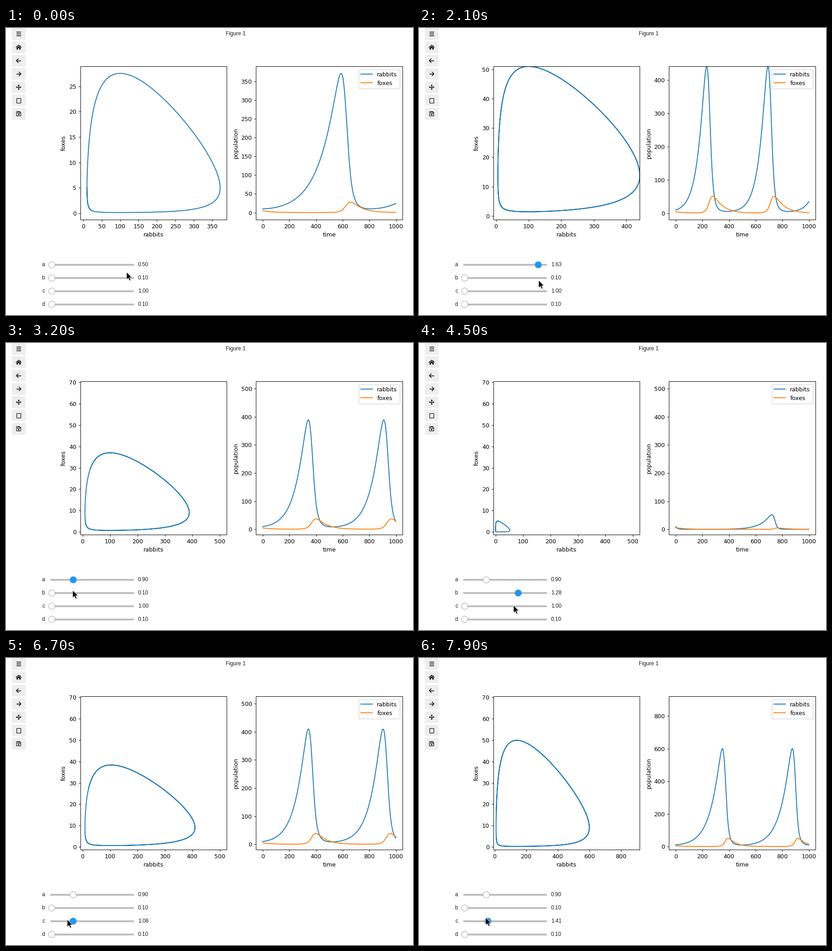
A matplotlib script for the animation above (8000 ms loop, 891 by 629 pixels).

```python
import numpy as np
import matplotlib.pyplot as plt
from matplotlib.animation import FuncAnimation
from matplotlib.patches import Circle, Polygon, Rectangle

W, H, DPI = 891, 629, 100
FRAMES, STEP = 80, 100
SCALE = 0.91  # default plot style, shrunk slightly
INK = "#1c1c1c"
BLUE = "#2196f3"

for key in ("font.size", "lines.linewidth", "axes.linewidth", "axes.labelpad",
            "patch.linewidth", "xtick.major.size", "ytick.major.size",
            "xtick.major.width", "ytick.major.width",
            "xtick.major.pad", "ytick.major.pad"):
    plt.rcParams[key] *= SCALE
plt.rcParams["font.family"] = "DejaVu Sans"


def px(n):
    """Pixels to points."""
    return n * 72 / DPI


def track(keys):
    """Piecewise linear motion over frame numbers."""
    times = [k[0] for k in keys]
    columns = list(zip(*[k[1:] for k in keys]))
    return lambda t: np.array([np.interp(t, times, c) for c in columns])


# ---- motion -----------------------------------------------------------
RANGES = [(0.5, 2), (0.1, 3), (1, 3), (0.1, 2)]
drag = [
    track([(12, .5), (13, .53), (19, 1.38), (20, 1.63), (21, 1.865),
           (23, 1.945), (25, 1.87), (28, 1.39), (30, .9)]),
    track([(38, .1), (43, 1.28), (44, 1.28), (45, 2.02), (47, 2.4),
           (48, 2.4), (51, 1.5), (54, .1)]),
    track([(64, 1), (65, 1.0424), (66, 1.08), (67, 1.53), (68, 1.984),
           (71, 1.984), (72, 1.88), (75, 1.284), (76, 1.284), (77, 1.41),
           (78, 1.41), (79, 1.576)]),
    track([(0, .1)]),
]
pointer = track([
    (2, 264, 535), (3, 180, 521), (4, 141, 517), (5, 141, 517),
    (6, 108, 513), (7, 87, 512), (8, 87, 512), (11, 99, 519.5),
    (12, 99, 519.5), (19, 203, 541), (20, 232, 548), (21, 262, 553),
    (23, 270, 557), (25, 262, 557), (28, 205, 553), (30, 147, 546),
    (32, 146, 542), (34, 114, 565), (37, 99, 548), (38, 99, 548),
    (43, 172, 570), (45, 207, 575), (47, 236, 577), (48, 236, 577),
    (51, 184, 574), (54, 101, 560), (56, 99, 552), (60, 99, 552),
    (63, 99, 574), (64, 99, 574), (66, 107, 572), (67, 134, 573),
    (68, 178, 584), (70, 187, 590), (71, 187, 590), (72, 177, 590),
    (75, 125, 580), (77, 135, 574), (79, 146, 569)])


def active_slider(i):
    return int(np.searchsorted([11, 37, 63], i, side="right")) - 1


# ---- predator and prey, all frames integrated together ----------------
frames = np.arange(FRAMES)
shown = np.array([m(frames)[0] for m in drag])
labels = np.array([m(frames - 1)[0] for m in drag])
a, b, c, d = np.array([m(np.where(frames == 70, 70, frames - 2))[0]
                       for m in drag])


def growth(z):
    x, y = z
    return np.array([a * x - b * x * y, -c * y + d * b * x * y])


def integrate(n=1000, span=15):
    h = span / (n - 1)
    out = np.empty((n, 2, FRAMES))
    out[0] = [[10], [5]]
    for k in range(n - 1):
        z = out[k]
        k1 = growth(z)
        k2 = growth(z + h / 2 * k1)
        k3 = growth(z + h / 2 * k2)
        k4 = growth(z + h * k3)
        out[k + 1] = z + h / 6 * (k1 + 2 * k2 + 2 * k3 + k4)
    return out


data = integrate()
rabbits, foxes = data[:, 0], data[:, 1]


def limits(low, high):
    """Margins around the first data, then only growth."""
    pad = 0.05 * (high[0] - low[0])
    lo, hi = low.copy(), high.copy()
    lo[0] -= pad
    hi[0] += pad
    return np.column_stack([np.minimum.accumulate(lo),
                            np.maximum.accumulate(hi)])


lim_r = limits(rabbits.min(0), rabbits.max(0))
lim_f = limits(foxes.min(0), foxes.max(0))
lim_p = limits(data.min((0, 1)), data.max((0, 1)))

# ---- figure -----------------------------------------------------------
fig = plt.figure(figsize=(W / DPI, H / DPI), dpi=DPI, facecolor="white")
ui = fig.add_axes([0, 0, 1, 1])
ui.set(xlim=(0, W), ylim=(H, 0))
ui.axis("off")


def plot_axes(x, xlabel, ylabel):
    y, w, h = 84.2, 320.57, 335.5
    ax = fig.add_axes([x / W, 1 - (y + h) / H, w / W, h / H])
    ax.set(xlabel=xlabel, ylabel=ylabel)
    return ax


phase = plot_axes(162.75, "rabbits", "foxes")
series = plot_axes(547.4, "time", "population")
orbit, = phase.plot(rabbits[:, 0], foxes[:, 0])
line_r, = series.plot(rabbits[:, 0], label="rabbits")
line_f, = series.plot(foxes[:, 0], label="foxes")
series.set_xlim(-49.95, 1048.95)
series.legend(loc="upper right")


def text(x, y, s, ha="left"):
    return ui.text(x, y, s, ha=ha, va="baseline", color=INK,
                   family="Liberation Sans", size=px(11.83))


def stroke(points, width=1.7):
    xs, ys = zip(*points)
    ui.plot(xs, ys, color=INK, lw=px(width), solid_capstyle="butt",
            solid_joinstyle="miter")


def shape(points, **style):
    patch = Polygon(points, **{"fc": INK, "ec": "none", **style})
    ui.add_patch(patch)
    return patch


text(503, 16, "Figure 1", "center")

# ---- toolbar ----------------------------------------------------------
CX = 27.7
rows = [13.3 + 29.1 * k for k in range(7)]
for y in rows:
    ui.add_patch(Rectangle((13, y - 13), 30, 25.6, fc="#eeeeee", ec="none"))

for dy in (-4, 0, 4):
    stroke([(CX - 5.2, rows[0] + dy), (CX + 5.2, rows[0] + dy)])

y = rows[1]
stroke([(CX - 6.2, y + .4), (CX, y - 4.8), (CX + 6.2, y + .4)], 1.5)
shape([(CX + 2.8, y - 4.8), (CX + 4.4, y - 4.8), (CX + 4.4, y), (CX + 2.8, y)])
shape([(CX + u, y + v) for u, v in (
    (-4.5, .9), (0, -2.9), (4.5, .9), (4.5, 5), (1.4, 5), (1.4, 1.9),
    (-1.4, 1.9), (-1.4, 5), (-4.5, 5))])

for y, s in ((rows[2], -1), (rows[3], 1)):
    stroke([(CX - 5 * s, y), (CX + 4.6 * s, y)])
    stroke([(CX + .5 * s, y - 4.6), (CX + 5 * s, y), (CX + .5 * s, y + 4.6)])

y = rows[4]
stroke([(CX - 4.5, y), (CX + 4.5, y)], 1.5)
stroke([(CX, y - 4.5), (CX, y + 4.5)], 1.5)
for u, v in ((1, 0), (-1, 0), (0, 1), (0, -1)):
    shape([(CX + 6 * u, y + 6 * v),
           (CX + 3.3 * u + 2.5 * v, y + 3.3 * v + 2.5 * u),
           (CX + 3.3 * u - 2.5 * v, y + 3.3 * v - 2.5 * u)])

y = rows[5]
ui.add_patch(Rectangle((CX - 4.7, y - 4.7), 9.4, 9.4, fill=False, ec=INK,
                       lw=px(1.3)))

y = rows[6]
shape([(CX - 4.7, y - 4.7), (CX + 2.5, y - 4.7), (CX + 4.7, y - 2.5),
       (CX + 4.7, y + 4.7), (CX - 4.7, y + 4.7)],
      fc="none", ec=INK, lw=px(1.3))
ui.add_patch(Rectangle((CX - 2.7, y - 4), 4.8, 2.8, fill=False, ec=INK,
                       lw=px(1)))
ui.add_patch(Circle((CX, y + 1.8), 1.5, fc=INK, ec="none"))

# ---- sliders ----------------------------------------------------------
handles, values = [], []
for k, name in enumerate("abcd"):
    y = 519 + 28.9 * k
    ui.add_patch(Rectangle((97, y - 2), 183, 3.8, fc="#bdbdbd", ec="none"))
    knob = Circle((100, y), 7, lw=px(1), zorder=4)
    ui.add_patch(knob)
    handles.append(knob)
    text(85, y + 3, name, "right")
    values.append(text(288.7, y + 3, ""))

ARROW = np.array([(0, 0), (0, 16.3), (3.7, 12.9), (6.3, 18.6), (8.9, 17.4),
                  (6.4, 11.9), (11.6, 11.7)])
shadow = shape(ARROW, fc="black", alpha=.25, zorder=5)
arrow = shape(ARROW, fc="black", ec="white", lw=px(.8), zorder=6)


def draw(i):
    on = active_slider(i)
    for k, (lo, hi) in enumerate(RANGES):
        frac = (shown[k, i] - lo) / (hi - lo)
        handles[k].center = (100 + 177 * frac, 519 + 28.9 * k)
        handles[k].set_facecolor(BLUE if k == on else "white")
        handles[k].set_edgecolor(BLUE if k == on else "#a8a8a8")
        values[k].set_text(f"{labels[k, i]:.2f}")
    orbit.set_data(rabbits[:, i], foxes[:, i])
    line_r.set_ydata(rabbits[:, i])
    line_f.set_ydata(foxes[:, i])
    phase.set(xlim=lim_r[i], ylim=lim_f[i])
    series.set_ylim(lim_p[i])
    tip = pointer(i)
    arrow.set_xy(ARROW + tip)
    shadow.set_xy(ARROW + tip + (1.5, 1))
    return []


anim = FuncAnimation(fig, draw, frames=FRAMES, interval=STEP,
                     init_func=lambda: draw(0), repeat=True, repeat_delay=0)
plt.show()
```
